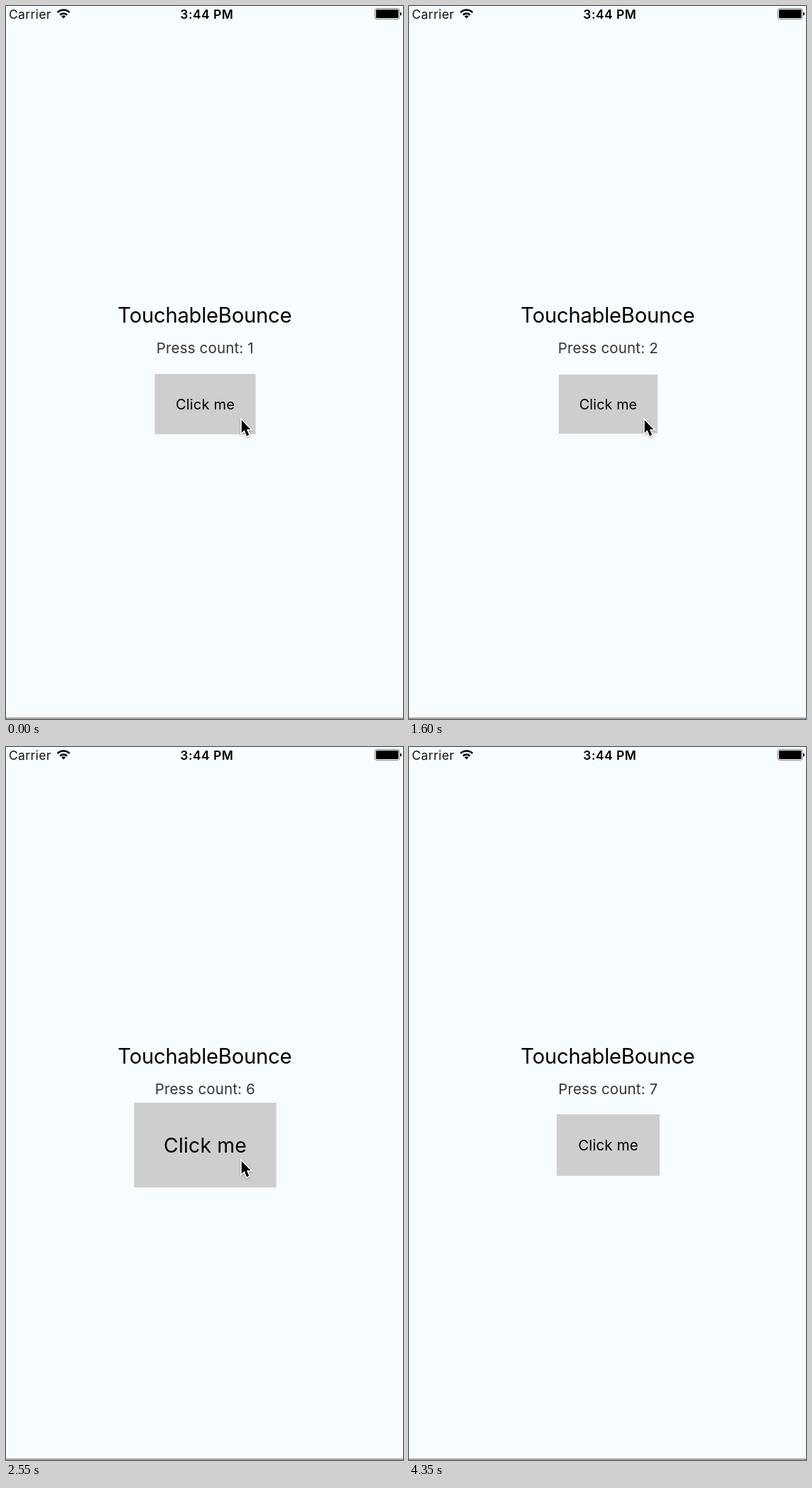
Animation of 559 by 1002 pixels, one loop 5.05 s. Source, as an HTML page:

```html
<!DOCTYPE html>
<html lang="en">
<head>
<meta charset="utf-8">
<title>TouchableBounce</title>
<style>
  html, body { margin: 0; width: 100%; height: 100%; overflow: hidden; background: #f6fcff; }
  svg { display: block; width: 100vw; height: 100vh; }
  text { font-family: Inter, Roboto, sans-serif; font-size: 20.5px; letter-spacing: .15px; }
  .status { font-size: 17.4px; letter-spacing: .4px; }
  .middle { text-anchor: middle; }
</style>
</head>
<body>
<svg viewBox="0 0 559 1002">
  <rect width="559" height="1002" fill="#f6fcff"/>
  <text class="status" x="4" y="17.5" fill="#111">Carrier</text>
  <g fill="none" stroke="#000" stroke-width="2.5">
    <path d="M72.5 9a12 12 0 0 1 17 0"/>
    <path d="M76.1 12.6a7 7 0 0 1 9.8 0"/>
    <path d="M81 17.5l-2.9-2.9a4.1 4.1 0 0 1 5.8 0z" fill="#000" stroke="none"/>
  </g>
  <text class="status middle" x="282.8" y="17.5" font-weight="600" style="letter-spacing:.5px">3:44 PM</text>
  <rect x="519.5" y="3.5" width="34.5" height="15" rx="2.5" fill="none" stroke="#808080"/>
  <rect x="521" y="5" width="31.5" height="12" rx="1.2"/>
  <path d="M555 8.5q2 .5 2 2.5t-2 2.5z"/>

  <text class="middle" x="279.8" y="445.2" style="font-size:29.2px;letter-spacing:-.23px">TouchableBounce</text>
  <text id="count" class="middle" x="280.3" y="487.8" fill="#333"></text>
  <g id="button">
    <rect x="-72.5" y="-43.2" width="145" height="86.4" fill="#cecece"/>
    <text class="middle" x="0" y="7.5">Click me</text>
  </g>
  <rect y="1000.3" width="559" height="1.2" fill="#666"/>
  <path id="cursor" d="M0 0V17.8L4 14 7.2 22.2 10.5 20.8 7.2 12.9H12.6Z"
    stroke="#fff" stroke-width="3.2" paint-order="stroke"
    style="filter:drop-shadow(0 1.5px 1.2px rgba(0,0,0,.35))"/>
</svg>
<script>
const LOOP = 5050, STEP = 50;
const STIFFNESS = 342.1, FIRM = 36.9, BOUNCY = 22.02;

const pressIn = at => ({ at, target: 0.93, velocity: 0.1, damping: FIRM });
const cancel = at => ({ at, target: 1, velocity: 0.4, damping: FIRM });
const press = (at, velocity) => ({ at, target: 1, velocity, damping: BOUNCY, counts: true });

const touches = [
  press(-270, 9.2),
  pressIn(530), press(777, 9.2),
  pressIn(1380), cancel(1558),
  press(1945, 10), press(2145, 10), press(2340, 12), press(2490, 11.2), press(2750, 10)
];

// Position of a damped spring, ms after it was released from `start`.
function spring(touch, start, ms) {
  const t = ms / 1000, decay = touch.damping / 2;
  const freq = Math.sqrt(STIFFNESS - decay * decay);
  const offset = start - touch.target;
  const swing = (touch.velocity + decay * offset) / freq;
  return touch.target + Math.exp(-decay * t) *
    (offset * Math.cos(freq * t) + swing * Math.sin(freq * t));
}

function stateAt(time) {
  let scale = 0.935, count = 0;
  touches.forEach((touch, i) => {
    if (touch.at > time) return;
    const next = touches[i + 1];
    const end = next ? Math.min(time, next.at) : time;
    scale = spring(touch, scale, end - touch.at);
    if (touch.counts) count++;
  });
  return { scale, count };
}

const bezier = (a, b, c, p) => a * (1 - p) ** 2 + 2 * b * p * (1 - p) + c * p * p;

const [button, count, cursor] = ['button', 'count', 'cursor'].map(id => document.getElementById(id));

function draw(time) {
  const state = stateAt(time);
  button.setAttribute('transform', `translate(280.5 559.5) scale(${state.scale})`);
  const label = `Press count: ${state.count}`;
  if (count.textContent !== label) count.textContent = label;

  const p = Math.min(1, Math.max(0, (time - 3870) / 430));
  const eased = p * p * (3 - 2 * p);
  const x = bezier(331.7, 185, 428, eased), y = bezier(582, 380, 78, eased);
  cursor.setAttribute('transform', `translate(${x} ${y})`);
  cursor.setAttribute('visibility', time < 4350 ? 'visible' : 'hidden');
}

const begin = performance.now();
function tick() {
  const time = (performance.now() - begin) % LOOP;
  draw(Math.floor(time / STEP) * STEP);
  requestAnimationFrame(tick);
}
tick();
</script>
</body>
</html>
```
